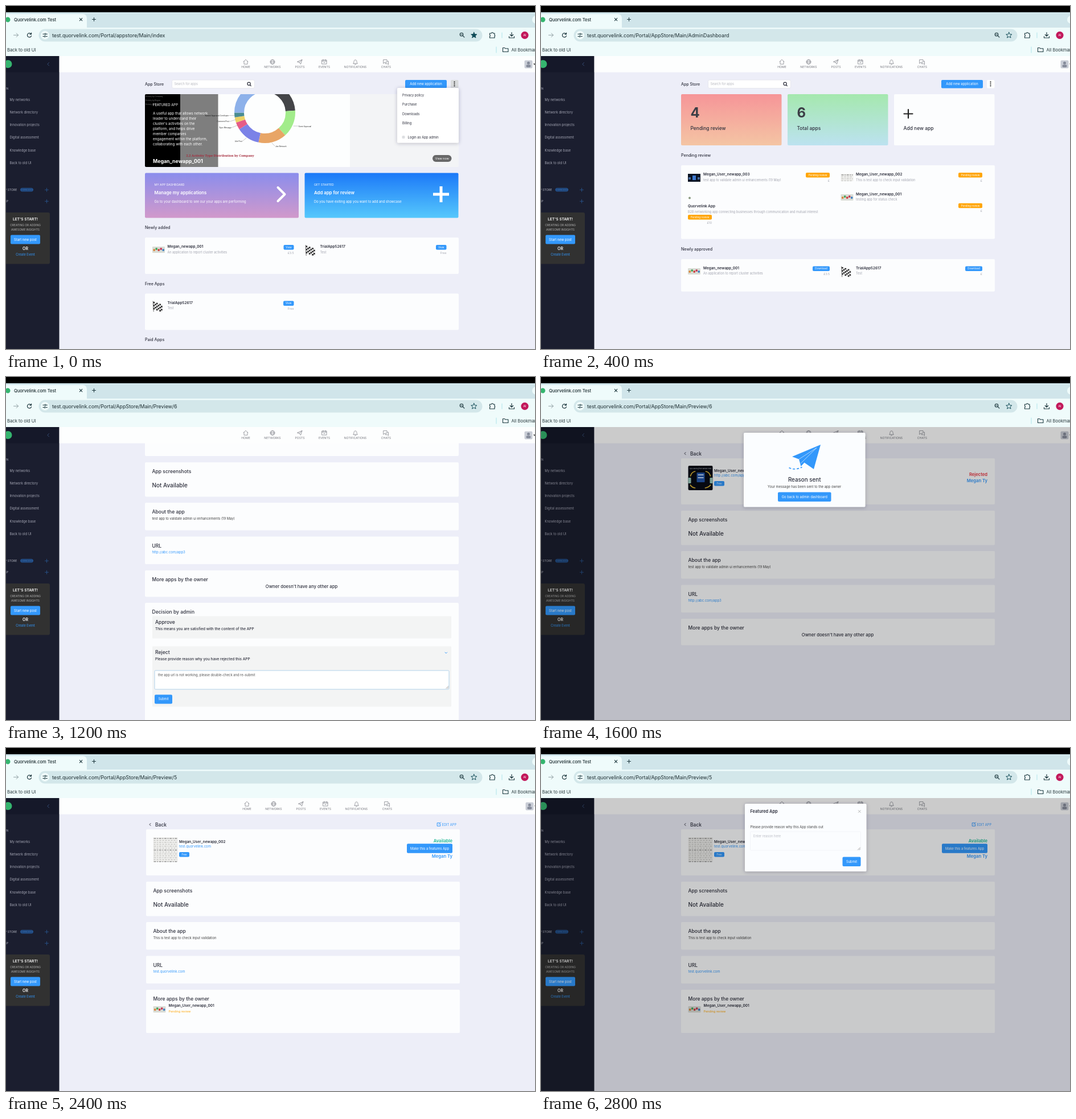
Recreate the animation shown at these times as an HTML page. Size 929 px wide and 603 px high, loop 3.2 s.

```html
<!DOCTYPE html>
<html lang="en">
<head>
<meta charset="utf-8">
<title>App store walkthrough</title>
<style>
  html, body { margin: 0; width: 100%; height: 100%; overflow: hidden; background: #edeef8; }
  svg { display: block; width: 929px; height: 603px; font-family: Inter, "Open Sans", sans-serif; }
  text { white-space: pre; }
</style>
</head>
<body>
<svg id="stage" viewBox="0 0 929 603" xmlns="http://www.w3.org/2000/svg">
  <defs>
    <linearGradient id="violet" x2="0" y2="1"><stop stop-color="#8b8dec"/><stop offset="1" stop-color="#d199cb"/></linearGradient>
    <linearGradient id="azure" x2="0" y2="1"><stop stop-color="#1c79f8"/><stop offset="1" stop-color="#56c8fc"/></linearGradient>
    <linearGradient id="coral" x2="0" y2="1"><stop stop-color="#f69598"/><stop offset="1" stop-color="#f4c5a4"/></linearGradient>
    <linearGradient id="mint" x2="0" y2="1"><stop stop-color="#a5e8ae"/><stop offset="1" stop-color="#bce2f0"/></linearGradient>
    <clipPath id="body"><rect x="93.5" y="116.5" width="836" height="487"/></clipPath>
    <clipPath id="feature"><rect x="244" y="155" width="551" height="128" rx="2"/></clipPath>
    <filter id="shadow" x="-20%" y="-20%" width="140%" height="140%">
      <feDropShadow dx="0" dy="1" stdDeviation="3" flood-color="#334" flood-opacity=".3"/>
    </filter>
  </defs>
</svg>
<script>
const STEP = 400, LOOP = 3200;
const INK = '#2d2f3c', SOFT = '#a3a5b0', BLUE = '#3398fb', AMBER = '#ffa60a', CARD = '#fcfdfe';
const SITE = 'test.quorvelink.com';
const OWNER = 'Megan Ty';
const userApp = n => `Megan_User_newapp_00${n}`;

const text = (x, y, str, size, fill = INK, weight = 400, anchor = 'start') =>
  `<text x="${x}" y="${y}" font-size="${size}" fill="${fill}" font-weight="${weight}" text-anchor="${anchor}">${str}</text>`;
const mid = (x, y, str, size, fill, weight) => text(x, y, str, size, fill, weight, 'middle');
const end = (x, y, str, size, fill, weight) => text(x, y, str, size, fill, weight, 'end');
const box = (x, y, w, h, fill, r = 0, extra = '') =>
  `<rect x="${x}" y="${y}" width="${w}" height="${h}" rx="${r}" fill="${fill}" ${extra}/>`;
const line = (d, color = INK, width = 1, fill = 'none') =>
  `<path d="${d}" fill="${fill}" stroke="${color}" stroke-width="${width}" stroke-linecap="round" stroke-linejoin="round"/>`;
const dot = (x, y, r, fill, extra = '') => `<circle cx="${x}" cy="${y}" r="${r}" fill="${fill}" ${extra}/>`;
const ring = (x, y, r, color, width) => dot(x, y, r, 'none', `stroke="${color}" stroke-width="${width}"`);
const shift = (dx, dy, content) => `<g transform="translate(${dx} ${dy})">${content}</g>`;
const button = (x, y, w, h, label, size, fill = BLUE, r = 2) =>
  box(x, y, w, h, fill, r) + mid(x + w / 2, y + h / 2 + size * .36, label, size, '#fff');
const panel = (y, h) => box(244, y, 551, h, CARD, 2);
const range = n => [...Array(n).keys()];

function browser() {
  const icon = '#1f3a40';
  return box(0, 0, 929, 603, '#edeef8') + box(0, 11, 929, 30, '#d0e5ea') +
    box(-10, 14, 152, 40, '#effbfb', 7) + box(0, 38, 929, 50, '#effbfb') + box(0, 0, 929, 11, '#000') +
    dot(3, 24, 4.5, '#35b56f') + text(14, 26.7, 'Quorvelink.com Test', 7.5, '#17262a', 500) +
    line('M129.300 21.300l4.500 4.500m0-4.500l-4.500 4.500M151.500 23.500h6m-3-3v6', icon, 1.1) + dot(931, 24, 7, '#effbfb') +
    line('M13.500 51.200h8m-3.300-3.300l3.300 3.300l-3.300 3.300', '#8d9da1') +
    line('M43.800 49a3.600 3.600 0 1 0 .7 3.300M44.500 47.200v2.500h-2.600', icon, 1.2) +
    box(57.500, 40.500, 779, 22, '#d3e7ea', 11) + dot(68.500, 51.300, 7.500, '#effbfb') +
    line('M64.800 49.300h2.500m3 0h2.200M64.800 53.400h2m3.200 0h2.500', icon) + ring(68.900, 49.300, 1.2, icon, 1) + ring(68.200, 53.400, 1.2, icon, 1) +
    ring(800, 50, 2.8, icon, 1.1) + line('M802.200 52.200l2.700 2.800M798.800 50h2.400', icon, 1.1) +
    line('M849.500 48h3a1.500 1.500 0 0 1 3 0h2.500v3a1.500 1.500 0 0 1 0 2.500v2.500h-8.500v-2.700a1.400 1.400 0 0 0 0-2.600z', icon, 1.2) +
    line('M871 47v9M861 72v10', '#aee3ea', 1) +
    line('M888 46.500v6.500m-2.800-2.700l2.800 2.700l2.800-2.700M883.500 53.500v2.500h9v-2.500', icon, 1.2) +
    dot(911, 51.300, 6.600, '#c2185b') + mid(911, 53.200, 'AI', 5.300, '#fff') +
    text(2, 79.600, 'Back to old UI', 7.7, '#26363a') +
    line('M872.500 73.500h3.200l1.200 1.300h5v5.700h-9.400z', icon, 1.1) + text(887.500, 79.600, 'All Bookmarks', 7.6, '#26363a');
}

function sidebar() {
  const links = ['My networks', 'Network directory', 'Innovation projects', 'Digital assessment', 'Knowledge base', 'Back to old UI'];
  return box(0, 88, 93.5, 515, '#1b1e2f') + box(0, 88, 93.5, 28.5, '#151829') +
    dot(3.500, 102, 7, '#35b56f') + line('M75.500 99.500l-2.700 2.700l2.700 2.700', '#3a5580', .9) +
    end(4.5, 147, 'MAIN', 5.2, '#9a9cab') +
    links.map((s, i) => text(6.5, 166.5 + i * 22.3, s, 5.8, '#a3a5b3')).join('') +
    end(19.5, 325.2, 'APP STORE', 5.2, '#b5b7c2') +
    box(25.500, 320.300, 22, 5.500, '#1c3f70', 2.7, 'stroke="#2b69b5" stroke-width=".7"') + mid(36.500, 324.400, 'COMING SOON', 2.7, '#4d94e6') +
    end(4, 345.3, 'HELP', 5.2, '#b5b7c2') + line('M68.500 323.200h6m-3-3v6M68.500 343.300h6m-3-3v6', '#27538c', .9) +
    box(-5, 363, 82, 90.500, '#313131', 3) + mid(34, 377, 'LET\'S START!', 6.6, '#fff', 600) +
    mid(34, 387.3, 'CREATING OR ADDING', 4.95, '#b4b4b4') + mid(34, 395, 'AWESOME INSIGHTS', 4.95, '#b4b4b4') +
    button(8, 402.500, 52, 16, 'Start new post', 5.8) + mid(34, 428.500, 'OR', 6.9, '#fff', 600) + mid(34, 438.700, 'Create Event', 5.5, BLUE);
}

function topNav(dx) {
  const tone = '#85868d', nib = d => line(d, tone, .8);
  const names = [[421, 'HOME'], [468, 'NETWORKS'], [516, 'POSTS'], [559, 'EVENTS'], [613.5, 'NOTIFICATIONS'], [667.5, 'CHATS']];
  return box(93.5, 88, 836, 28.5, '#fdfefe') + shift(dx, 0,
    names.map(([x, s]) => mid(x, 109.4, s, 5.15, '#74757d')).join('') +
    nib('M417 98l4-3.800l4 3.800M418 97.200v5h6v-5') +
    ring(468, 98.300, 4, tone, .8) + nib('M464 98.300h8M468 94.300c-3 3-3 5 0 8c3-3 3-5 0-8') +
    nib('M511.800 98l8.200-3.700l-2.500 8l-2.200-3zM520 94.300l-4.700 5') +
    nib('M555 95h8v7h-8zM555 97h8M557 94v2m4-2v2M558 99.500h2') +
    nib('M610 101c1.300-1.500.8-3 1.200-4.500a2.400 2.400 0 0 1 4.600 0c.4 1.500 0 3 1.200 4.500zM612.700 102.500h1.600') +
    nib('M663 94.500h6v4.500h-4l-2 1.800zM670 97h1.500v6l-1.800-1.500h-3.500v-1.500') +
    box(910.500, 95.500, 14, 14, '#c9cdd6', 2) + dot(917.500, 100.300, 2.5, '#858b9a') +
    box(913.500, 103.300, 8, 4.500, '#858b9a', 2) + line('M926.800 101.500h3l-1.500 1.800z', '#333', .6, '#333'));
}

const star = saved => line('M821.800 46.200l1.400 3.400l3.700.3l-2.800 2.400l.9 3.600l-3.200-2l-3.200 2l.9-3.600l-2.800-2.400l3.700-.3z', '#164e59', 1, saved ? '#0d4a57' : 'none');

// Thumbnails
function people(x, y) {
  const tones = ['#d8873c', '#46a55a', '#cf4040', '#c43a58', '#3f7fc0'];
  return box(x, y, 22, 11, '#d9dcd5', 1) +
    tones.map((c, i) => dot(x + 3.2 + i * 4, y + 5 + (i % 2 ? -1 : 1), 1.9, c)).join('');
}
function flag(x, y) {
  const squares = range(30).map(i => {
    const col = i % 6, row = i / 6 | 0;
    return box(x + 1 + col * 2.7, y + 2 + row * 2.7 + col * .9, 2.7, 2.7, (col + row) % 2 ? '#e8e8e8' : '#2c2c2c');
  });
  return squares.join('') + line(`M${x + .7} ${y + 1}l1 18`, '#555', .9);
}
function sheet(x, y, w, h) {
  const rows = Math.round(h / 3.4);
  return box(x, y, w, h, '#f0f0ee') + range(rows).map(i =>
    `<path d="M${x + 1} ${y + 2 + i * 3.4}h${w - 2}" stroke="${i % 6 ? '#b5b5b2' : '#666'}" stroke-width="1" stroke-dasharray="${i % 2 ? '3 2' : '4 1.600 2 1.600'}"/>`).join('');
}
function darkTile(x, y) {
  return box(x, y, 43, 43, '#080c16', 2) + mid(x + 21.500, y + 6, 'App Learning from Sample Tests', 2.5, '#ddd') +
    box(x + 15, y + 12, 14, 17, '#2356a8', 1) + box(x + 17, y + 15, 10, 2, '#bcd4f5') + box(x + 17, y + 20, 10, 2, '#bcd4f5') +
    box(x, y + 21, 5, 10, '#9bc9bd', 1) + box(x + 38, y + 21, 5, 10, '#9bc9bd', 1) +
    line(`M${x + 4} ${y + 18}q2-7 8-8M${x + 31} ${y + 10}q6 1 8 8M${x + 39} ${y + 34}q-3 4-9 5M${x + 12} ${y + 39}q-6-1-8-5`, '#e3bb35', 1.7);
}
function darkThumb(x, y) {
  return box(x, y, 22, 14, '#0b1424') + box(x + 8, y + 3, 6, 8, '#3c78cf') + box(x + 1, y + 6, 4, 4, '#476b9c') + box(x + 17, y + 6, 4, 4, '#476b9c');
}

// App list entry: baseline y, badge label and width, price
function entry(x, y, title, note, badge, price, badgeW, fill, drop = 0) {
  const right = x + 222;
  return text(x, y, title, 6.4, INK, 600) + text(x, y + 9.5, note, 5.5, SOFT) +
    button(right - badgeW, y - 5 + drop, badgeW, 8.5, badge, 4.5, fill) + end(right, y + 10.500 + drop, price, 5.2, SOFT);
}

function storeBar(menuOpen) {
  return text(244, 139.6, 'App Store', 7, INK, 500) + box(291.500, 130, 145, 14.500, '#fff', 2.5, 'stroke="#e2e3ea" stroke-width=".8"') +
    text(295.5, 139.2, 'Search for apps', 5.5, '#b6b7be') + ring(426.600, 136.800, 2.6, INK, 1.2) + line('M428.600 138.800l1.600 1.700', INK, 1.2) +
    button(701, 130, 73, 14.500, 'Add new application', 5.9) +
    box(781, 130, 13.500, 14.500, menuOpen ? '#d9dbdc' : '#fff', 2) + [133.700, 137, 140.300].map(y => dot(787.500, y, 1.1, '#222')).join('');
}

function featured() {
  const arcs = [[-90, -4, '#444548'], [-4, 48, '#a2ec8b'], [48, 102, '#e8a566'], [102, 147, '#7b82e7'],
    [147, 161, '#e65c87'], [161, 171, '#ebd268'], [171, 180, '#4a8d92'], [180, 270, '#8db1ea']];
  const at = a => `${454.5 + 45 * Math.cos(a * Math.PI / 180)} ${187.5 + 45 * Math.sin(a * Math.PI / 180)}`;
  const donut = arcs.map(([a, b, c]) => `<path d="M${at(a)}A45 45 0 0 1 ${at(b)}" fill="none" stroke="${c}" stroke-width="17"/>`).join('');
  const labels = [[391, 193.7, 'Submit Approved Certificate'], [392, 204, 'Comment Post'], [396, 214.7, 'Sync Message'], [415, 238.5, 'Like Post']];
  const blurb = ['A useful app that allows network', 'leader to understand their', 'cluster\'s activities on the', 'platform, and helps drive',
    'member companies', 'engagement within the platform,', 'collaborating with each other.'];
  return `<g clip-path="url(#feature)">${box(244, 155, 551, 128, '#f3f4f6') + box(306, 155, 298, 128, '#fdfefe') + donut +
    labels.map(([x, y, s]) => end(x, y, s, 3.1, '#222')).join('') + text(473, 248, 'Join Network', 3.1, '#222') + text(514, 212.5, 'Event Approval', 3.1, '#222') +
    line('M392 192.500h9M393 203l10-3M397 213.500l10-4M416 237l6-5M472 246l-5-5M513 211h-8', '#777', .4) +
    box(244, 155, 62, 128, '#000') + box(306, 155, 66.500, 128, '#000', 0, 'opacity=".5"')}` +
    ['Activity by Company', 'Activity by Region', 'Activity by Sector'].map((s, i) => text(245, 160.3 + i * 7, s, 3.1, '#777')).join('') +
    `<text x="316.500" y="265.300" font-size="5.600" font-weight="700" fill="#a52b3c" font-family="Noto Serif, serif">2.2 Activity Type Distribution by Company</text></g>` +
    text(258, 176, 'FEATURED APP', 5.95, '#fff') + blurb.map((s, i) => text(258, 190.6 + i * 9, s, 6.25, '#fff')).join('') +
    text(258, 275.5, 'Megan_newapp_001', 8.8, '#fff', 700) + button(749, 262, 33.500, 12, 'View now', 5.2, '#686868', 6);
}

function banner(x, fill, small, title, note) {
  return box(x, 293.5, 270, 79, `url(#${fill})`, 2) + text(x + 16.500, 316.200, small, 5.15, '#fff') +
    text(x + 16.500, 331.300, title, 7.8, '#fff', 600) + text(x + 16.500, 346.200, note, 5.85, '#fff');
}

function store() {
  const menu = ['Privacy policy', 'Purchase', 'Downloads', 'Billing'];
  const trial = (x, y) => flag(x - 26, y - 5.500) + entry(x, y, 'TrialApp52617', 'Test', 'View', 'Free', 18.500, BLUE);
  return storeBar(true) + featured() +
    banner(244, 'violet', 'MY APP DASHBOARD', 'Manage my applications', 'Go to your dashboard to see our your apps are performing') +
    banner(524.5, 'azure', 'GET STARTED', 'Add app for review', 'Do you have exiting app you want to add and showcase') +
    line('M477.500 319l12 12l-12 12', '#fff', 4) + `<path d="M750 331h28m-14-14v28" stroke="#fff" stroke-width="5"/>` +
    text(244, 392, 'Newly added', 7.1, INK, 500) + panel(407, 64) + people(257, 423) +
    entry(283.500, 425, 'Megan_newapp_001', 'An application to report cluster activities', 'View', '£3.5', 18.500-.5, BLUE) + trial(551.500, 425) +
    text(244, 490.500, 'Free Apps', 7.1, INK, 500) + panel(505.500, 64) + trial(283.500, 523.500) +
    text(244, 589, 'Paid Apps', 7.1, INK, 500) +
    box(687, 144, 108, 96.500, '#fff', 2, 'filter="url(#shadow)"') + menu.map((s, i) => text(696, 158.5 + i * 16.6, s, 5.75)).join('') +
    box(695.500, 228, 5, 5, '#dddfe2', 1.5) + text(705.500, 232.500, 'Login as App admin', 5.8);
}

function dashboard() {
  const tile = (x, fill, big, label) => box(x, 155, 176.5, 90, fill, 2) +
    (big ? text(x + 16.5, 195.5, big, 24, '#3c3e46', 700) : line(`M${x + 17.5} 189.500h15m-7.500-7.500v15`, '#222', 2.2)) + text(x + 16.5, 218, label, 8.45, INK, 500);
  const pending = (x, y, n, note, price, drop) => entry(x, y, userApp(n), note, 'Pending review', price, 42, AMBER, drop);
  return storeBar(false) + tile(244, 'url(#coral)', '4', 'Pending review') + tile(431, 'url(#mint)', '6', 'Total apps') + tile(618, CARD, '', 'Add new app') +
    text(244, 264.8, 'Pending review', 7.1, INK, 500) + panel(280, 129.5) +
    darkThumb(256, 295) + pending(283, 298, 3, 'test app to validate admin ui enhancements (19 May)', '£') +
    sheet(524.500, 295, 22, 13) + pending(551, 298, 2, 'This is test app to check input validation', '£') +
    people(524.500, 331) + pending(551, 332.700, 1, 'testing app for status check', '£', 19) +
    dot(259, 337.500, 2, '#8a9a80') + text(256, 354.3, 'Quorvelink App', 6.4, INK, 600) +
    text(256, 363.5, 'B2B networking app connecting businesses through communication and mutual interest', 5.5, SOFT) +
    button(256, 367, 42, 8.500, 'Pending review', 4.5, AMBER) + end(298, 382.500, '£10', 5.2, SOFT) +
    text(244, 429.5, 'Newly approved', 7.1, INK, 500) + panel(445, 57) + people(256, 461) +
    entry(283, 462.500, 'Megan_newapp_001', 'An application to report cluster activities', 'Download', '£3.5', 30, BLUE) +
    flag(525, 457) + entry(551, 462.500, 'TrialApp52617', 'Test', 'Download', '£', 30, BLUE);
}

const apps = {
  3: { link: 'http://abc.com/app3', about: 'test app to validate admin ui enhancements (19 May)', art: darkTile(256.5, 156) },
  2: { link: SITE, about: 'This is test app to check input validation', art: sheet(256.5, 157, 43, 43), editable: true, sibling: true }
};

function decision(y, rejecting) {
  const block = (top, h, title, note) => box(257, top, 525, h, '#f3f4f4', 1) +
    text(262, top + 13.5, title, 8.6, INK, 500) + text(262, top + 24.7, note, 6.45, INK, 500);
  const form = box(261, y + 119, 517, 33, '#fff', 1.5, 'stroke="#a9cde8" stroke-width=".9"') +
    text(267, y + 129, 'the app url is not working, please double-check and re-submit', 5.8, '#555') +
    line(`M773 ${y + 150.5}l4-4m-1.500 4l1.500-1.500`, '#777', .7) + button(261, y + 161.5, 31, 16, 'Submit', 5.5);
  return panel(y, 260) + text(256.5, y + 18.7, 'Decision by admin', 8.5, INK, 500) +
    block(y + 23.5, 39, 'Approve', 'This means you are satisfied with the content of the APP') +
    block(y + 76.5, rejecting ? 106 : 39, 'Reject', 'Please provide reason why you have rejected this APP') +
    line(rejecting ? `M771 ${y + 87}l1.800 1.800l1.800-1.800` : `M772.500 ${y + 85}l2 2l-2 2`, BLUE, 1) + (rejecting ? form : '');
}

function preview(id, status, rejecting) {
  const app = apps[id], moreH = app.sibling ? 76 : 46.5;
  const heading = (y, s) => text(256.5, y + 19, s, 8.5, INK, 500);
  const available = status === 'Available';
  const statusTone = { Available: '#1fb895', Rejected: '#e8333f' }[status] || AMBER;
  return line('M252 132.500l-2 2l2 2', INK, 1) + text(260, 137.500, 'Back', 8.5, INK, 500) +
    (app.editable ? line('M759.500 131.700h-4.300v5.500h5.500v-3.500M757.700 134.700l4-4', BLUE, 1) + text(763.500, 136.600, 'EDIT APP', 5.7, BLUE) : '') +
    panel(143, 81) + app.art + text(302, 166.500, userApp(id), 6.4, INK, 600) + text(302, 175, app.link, 6, BLUE) + button(302, 183, 18, 8.500, 'Free', 4.3) +
    end(782, available ? 165.500 : 173.500, status, 7.6, statusTone, 600) +
    (available ? button(702, 168.300, 80, 16.500, 'Make this a features App', 5.8) : '') +
    end(782, available ? 193 : 184.700, OWNER, 7.6, BLUE, 600) +
    panel(235, 60.500) + heading(235, 'App screenshots') + text(256.500, 279, 'Not Available', 9.95, INK, 500) +
    panel(306, 48.500) + heading(306, 'About the app') + text(256.500, 336, app.about, 5.85, '#444') +
    panel(365.500, 48.500) + heading(365.500, 'URL') + text(256.500, 395.200, app.link, 6, BLUE) +
    panel(425, moreH) + heading(425, 'More apps by the owner') +
    (app.sibling ? people(256.500, 454) + text(283.500, 455.300, userApp(1), 6.4, INK, 600) + text(283.500, 465, 'Pending review', 5.35, AMBER)
      : mid(519, 456, 'Owner doesn\'t have any other app', 7.7, INK, 500)) +
    (status === 'Pending review' ? decision(425 + moreH + 10.5, rejecting) : '');
}

const veil = box(0, 88, 929, 515, '#000', 0, 'opacity=".2"');
const dialog = (x, h) => veil + box(x, 98, 213.5, h, '#fbfdff', 2, 'filter="url(#shadow)"');

const sentDialog = dialog(356, 130.5) +
  `<path d="M491 119L441 140l12 4.500l3.500 12.500l6-6.500L479 162z" fill="${BLUE}"/>` + line('M453 144.500l31-20l-27.500 27', '#fbfdff', .6) +
  `<path d="M435.500 159.500q10 5 23-1" fill="none" stroke="${BLUE}" stroke-width="1.700" stroke-dasharray="4 3"/>` +
  mid(462.700, 183.500, 'Reason sent', 9.8, INK, 500) + mid(462.700, 194.700, 'Your message has been sent to the app owner', 5.9, '#444') +
  button(416, 202.500, 93.500, 16.500, 'Go back to admin dashboard', 5.9);

const featureDialog = dialog(358, 119) +
  text(367.5, 114.2, 'Featured App', 7.4, INK, 600) + line('M557.300 109.500l4 4m0-4l-4 4', '#999', .7) +
  text(367.5, 141.3, 'Please provide reason why this App stands out', 5.8, '#444') +
  box(367.500, 147, 194, 33, '#fbfdff', 1.5, 'stroke="#f0f2f6" stroke-width=".8"') + text(373, 156.500, 'Enter reason here', 5.75, '#bbbdc4') +
  line('M556.500 179l4-4m-1.500 4l1.500-1.500', '#777', .7) + button(529.500, 191.500, 32, 16.500, 'Submit', 5.8);

const scene = (path, dx, dy, content, extra = '') =>
  text(81, 54.6, `${SITE}/Portal/${path}`, 8.8, '#1d2d31') + star(path.startsWith('appstore')) +
  `<g clip-path="url(#body)">${shift(dx, dy, content)}</g>` + topNav(dx) + extra;

const rejectPath = 'AppStore/Main/Preview/6', approvePath = 'AppStore/Main/Preview/5';
const scenes = [
  scene('appstore/Main/index', 0, 0, store()),
  scene('AppStore/Main/AdminDashboard', 2, 0, dashboard()),
  scene(rejectPath, 0, -6.5, preview(3, 'Pending review')),
  scene(rejectPath, 0, -85, preview(3, 'Pending review', true)),
  scene(rejectPath, 2, 0, preview(3, 'Rejected'), sentDialog),
  scene(approvePath, 0, -6.5, preview(2, 'Pending review')),
  scene(approvePath, 2, 0, preview(2, 'Available')),
  scene(approvePath, 2, 0, preview(2, 'Available'), featureDialog)
];

const stage = document.getElementById('stage');
stage.insertAdjacentHTML('beforeend', browser() + sidebar() + scenes.map(s => `<g class="scene" opacity="0">${s}</g>`).join(''));

const share = STEP / LOOP;
const blink = [{ opacity: 1, offset: 0 }, { opacity: 1, offset: share }, { opacity: 0, offset: share }, { opacity: 0, offset: 1 }];
document.querySelectorAll('.scene').forEach((el, i) =>
  el.animate(blink, { duration: LOOP, iterations: Infinity, delay: i * STEP - LOOP }));
</script>
</body>
</html>
```
